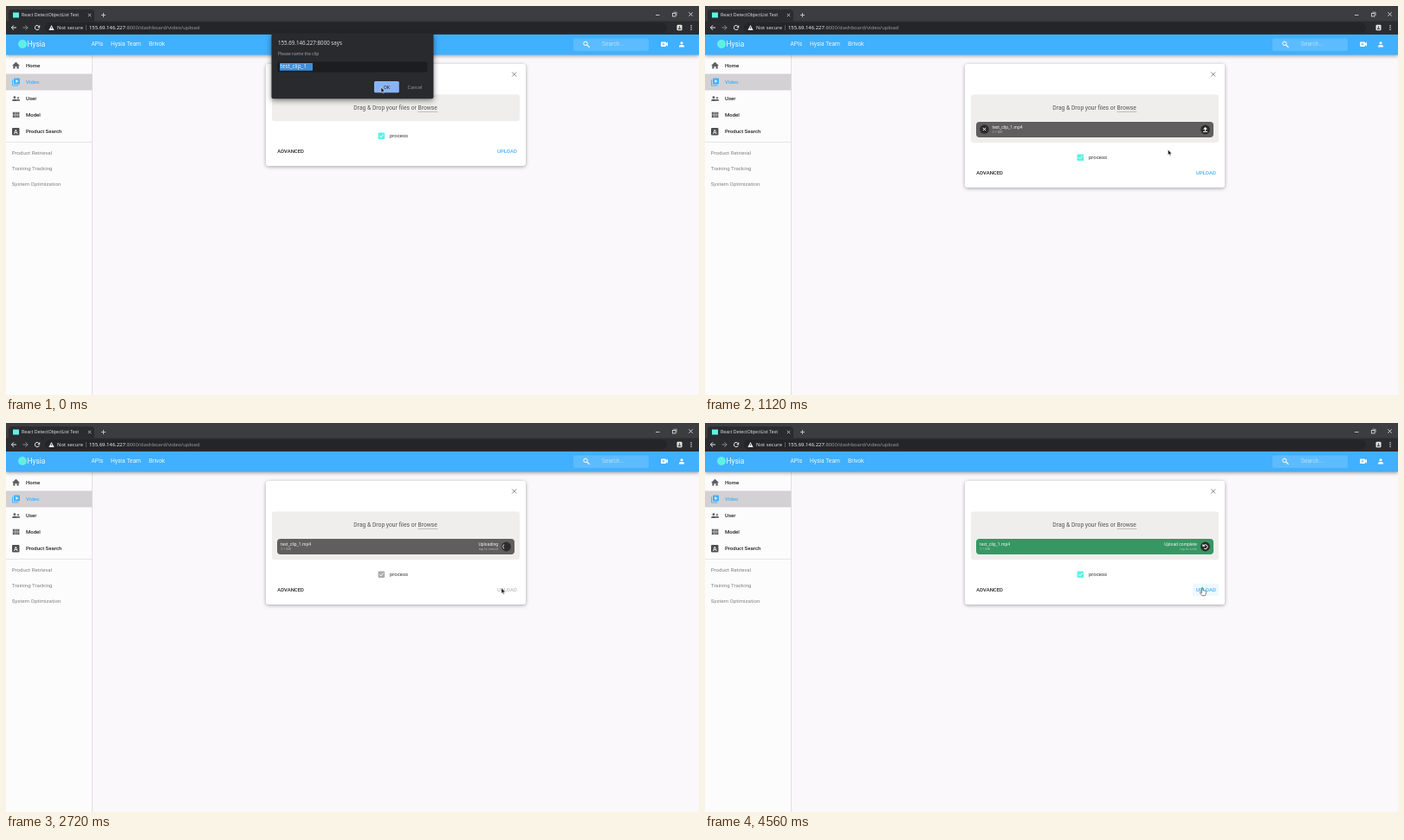
These frames come from a looping animation (800x450 px, 4.6 s). An HTML page with a canvas:

```html
<!DOCTYPE html>
<html lang="en">
<head>
<meta charset="utf-8">
<title>Video upload</title>
<style>
  html, body { margin: 0; width: 100%; height: 100%; overflow: hidden; background: #faf8fb; }
  canvas { display: block; width: 800px; height: 450px; }
</style>
</head>
<body>
<canvas id="stage" width="800" height="450"></canvas>
<script>
const c = document.getElementById('stage').getContext('2d');
const LOOP = 4600, TAU = Math.PI * 2;
const UI = 'Roboto, sans-serif', SYS = '"Noto Sans", sans-serif';
const BLUE = '#40b0ff', CYAN = '#5ff0e4';

const ramp = (t, a, b) => Math.min(1, Math.max(0, (t - a) / (b - a)));
const easeOut = p => 1 - (1 - p) ** 3;
const easeInOut = p => p * p * (3 - 2 * p);
const mix = (a, b, p) => a + (b - a) * p;
const mixColor = (a, b, p) => `rgb(${a.map((v, i) => Math.round(mix(v, b[i], p)))})`;

function text(s, x, y, size, color, { font = UI, weight = 400, align = 'left' } = {}) {
  c.font = `${weight} ${size}px ${font}`;
  c.textAlign = align;
  c.textBaseline = 'middle';
  c.fillStyle = color;
  c.fillText(s, x, y);
}
function box(x, y, w, h, color, r = 0) {
  c.fillStyle = color;
  c.beginPath();
  c.roundRect(x, y, w, h, r);
  c.fill();
}
function disc(x, y, r, color) {
  c.fillStyle = color;
  c.beginPath();
  c.arc(x, y, r, 0, TAU);
  c.fill();
}
function poly(points, color) {
  c.fillStyle = color;
  c.beginPath();
  points.forEach(([x, y]) => c.lineTo(x, y));
  c.closePath();
  c.fill();
}
function line(points, color, width = 1) {
  c.strokeStyle = color;
  c.lineWidth = width;
  c.beginPath();
  points.forEach(([x, y], i) => i ? c.lineTo(x, y) : c.moveTo(x, y));
  c.stroke();
}
function arc(x, y, r, from, to, color, width = 1) {
  c.strokeStyle = color;
  c.lineWidth = width;
  c.beginPath();
  c.arc(x, y, r, from, to);
  c.stroke();
}
function cross(x, y, r, color, width = 1) {
  line([[x - r, y - r], [x + r, y + r]], color, width);
  line([[x + r, y - r], [x - r, y + r]], color, width);
}
function shadowed(blur, dy, alpha, draw) {
  c.save();
  c.shadowColor = `rgba(0,0,0,${alpha})`;
  c.shadowBlur = blur;
  c.shadowOffsetY = dy;
  draw();
  c.restore();
}
function faded(alpha, draw) {
  if (alpha <= 0) return;
  c.save();
  c.globalAlpha *= alpha;
  draw();
  c.restore();
}
function person(x, y, s, color) {
  disc(x, y - s * 0.5, s * 0.46, color);
  box(x - s * 0.9, y + s * 0.2, s * 1.8, s * 0.7, color, [s * 0.6, s * 0.6, 0, 0]);
}

function browser() {
  box(0, 0, 800, 33, '#2b2c2f');
  box(0, 0, 800, 17.5, '#3c3d40');
  box(3, 4, 99, 14, '#2b2c2f', [4, 4, 0, 0]);
  box(8, 7.5, 7, 6, CYAN);
  text('React DetectObjectList Test', 18, 10.5, 5.2, '#e0e0e0', { font: SYS });
  cross(96.5, 10.5, 1.7, '#d0d0d0', 0.8);
  line([[110, 10.5], [115, 10.5]], '#d8d8d8', 0.8);
  line([[112.5, 8], [112.5, 13]], '#d8d8d8', 0.8);
  line([[750, 10.5], [754.5, 10.5]], '#e0e0e0', 0.8);
  c.strokeStyle = '#e0e0e0';
  c.strokeRect(769.5, 8.5, 3.5, 3.5);
  line([[770.5, 7.2], [774.2, 7.2], [774.2, 11]], '#e0e0e0', 0.6);
  cross(790.5, 9.5, 2.1, '#e8e8e8', 0.9);

  box(45, 19, 718, 12, '#242528', 6);
  line([[12, 25], [6.5, 25]], '#e8e8e8');
  line([[9, 22.3], [6.3, 25], [9, 27.7]], '#e8e8e8');
  line([[19.5, 25], [25, 25]], '#8c8c8c');
  line([[22.5, 22.3], [25.2, 25], [22.5, 27.7]], '#8c8c8c');
  arc(36, 25, 2.6, 0.3, 5.4, '#e8e8e8', 1);
  poly([[39.2, 22], [39.2, 25], [36.3, 25]], '#e8e8e8');
  poly([[52.5, 22], [55.7, 28], [49.3, 28]], '#e8e8e8');
  line([[52.5, 24.2], [52.5, 26.2]], '#242528', 0.7);
  text('Not secure', 59, 25, 5.9, '#e0e0e0', { font: SYS });
  line([[92.5, 22], [92.5, 28]], '#77787a', 0.6);
  const host = '155.69.146.227';
  text(host, 96, 25, 5.9, '#eeeeee', { font: SYS });
  text(':8000/dashboard/video/upload', 96 + c.measureText(host).width, 25, 5.9, '#9b9da0', { font: SYS });
  box(774.5, 21.8, 6, 6.4, '#e8e8e8', 1);
  person(777.5, 25.3, 1.9, '#2b2c2f');
  [-2.3, 0, 2.3].forEach(dy => disc(791, 25 + dy, 0.75, '#e0e0e0'));
}

function header() {
  shadowed(4, 1, 0.35, () => box(0, 33, 800, 23.5, BLUE));
  disc(19, 44, 5, CYAN);
  text('Hysia', 24.5, 44.3, 8.4, '#f2fbff');
  text('APIs', 98.5, 44.2, 6.67, '#eef8ff');
  text('Hysia Team', 121, 44.2, 6.67, '#eef8ff');
  text('Brivok', 165, 44.2, 6.67, '#eef8ff');
  box(655, 37.5, 87, 14.5, 'rgba(255,255,255,.15)', 2);
  arc(669, 43.3, 2.2, 0, TAU, '#fff', 1);
  line([[670.6, 44.9], [673.6, 47.9]], '#fff', 1.2);
  text('Search...', 688, 44.3, 6.67, 'rgba(255,255,255,.55)');
  box(756, 41.5, 6, 5.5, '#fff', 0.8);
  poly([[761, 44.2], [764, 41.6], [764, 46.8]], '#fff');
  line([[757.4, 44.2], [760.6, 44.2]], BLUE, 0.7);
  line([[759, 42.6], [759, 45.8]], BLUE, 0.7);
  person(780, 44.4, 3.4, '#fff');
}

function sidebar() {
  box(0, 57, 99, 393, '#fdfcfd');
  box(99, 57, 1, 393, '#e2e0e2');
  box(0, 78.5, 99.5, 19, '#d3d1d3');
  ['Home', 'Video', 'User', 'Model', 'Product Search'].forEach((label, i) =>
    text(label, 23, 69 + i * 19, 6, i === 1 ? BLUE : '#222', { weight: 500 }));
  const ink = '#606062';
  poly([[11.5, 64.8], [16, 69], [14.7, 69], [14.7, 72.6], [12.5, 72.6], [12.5, 70],
    [10.5, 70], [10.5, 72.6], [8.3, 72.6], [8.3, 69], [7, 69]], ink);
  box(9, 83.5, 7, 7, BLUE, 0.7);
  line([[7.5, 85.3], [7.5, 92], [14.3, 92]], BLUE, 0.9);
  poly([[11.4, 85], [14.5, 87], [11.4, 89]], '#e8f5ff');
  person(9.9, 107.2, 3, ink);
  person(14, 107.5, 2.4, ink);
  for (let i = 0; i < 6; i++) box(7.8 + i % 3 * 2.7, 122.7 + Math.floor(i / 3) * 3.5, 2.2, 3, ink);
  box(7, 141, 8.5, 8.5, '#505052', 1);
  text('A', 11.25, 145.5, 7, '#fff', { weight: 500, align: 'center' });
  box(0, 157.2, 99, 0.8, '#e0dee0');
  ['Product Retrieval', 'Training Tracking', 'System Optimization'].forEach((label, i) =>
    text(label, 6.7, 170.4 + i * 18, 6.13, '#808082'));
}

function fileItem(t) {
  const y = mix(133, 134, ramp(t, 680, 860)), mid = y + 9;
  const sent = easeOut(ramp(t, 2080, 2440));
  const done = ramp(t, 3760, 4040);
  const white = a => `rgba(255,255,255,${a})`;
  box(313, y, 274, 18, mixColor([96, 94, 94], [54, 151, 99], done), 4);

  const nameX = mix(331.5, 317, sent);
  text('test_clip_1.mp4', nameX, mid - 2.3, 5, '#f4f4f4');
  text('3.1 MB', nameX, mid + 3, 3.9, white(0.5));
  const status = (main, sub) => {
    text(main, 568, mid - 2.3, 5, '#f4f4f4', { align: 'right' });
    text(sub, 568, mid + 3, 3.9, white(0.5), { align: 'right' });
  };
  faded(sent * (t < 3760 ? 1 : 0), () => status('Uploading', 'tap to cancel'));
  faded(ramp(t, 3760, 3860), () => status('Upload complete', 'tap to undo'));

  faded(1 - sent, () => {
    disc(322.5, mid - 0.5, 5.3, '#2e2d2d');
    cross(322.5, mid - 0.5, 1.6, '#fff', 1);
  });
  disc(577.5, mid, 5.4, '#2b2d2c');
  faded(1 - sent, () => {
    poly([[577.5, mid - 3], [580, mid - 0.4], [575, mid - 0.4]], '#fff');
    line([[577.5, mid - 1], [577.5, mid + 1.5]], '#fff', 1.3);
    line([[575, mid + 2.4], [580, mid + 2.4]], '#fff', 0.9);
  });
  faded(sent * (1 - ramp(t, 3860, 4060)), () => {
    const start = (t - 3200) / 1000 * TAU - 0.9;
    const span = mix(0.5, 2.6, ramp(t, 2250, 3200));
    arc(577.5, mid, 3.7, start, start + span, '#e8e8e8', 0.9);
  });
  faded(ramp(t, 3960, 4200), () => {
    arc(577.7, mid + 0.2, 2.4, -2.5, 2.3, '#fff', 1);
    poly([[574.3, mid - 3], [574.5, mid + 0.2], [577.4, mid - 0.8]], '#fff');
  });
}

function panel(t) {
  const grow = 25 * easeOut(ramp(t, 160, 600));
  const disabled = t >= 2560 && t < 3760;
  shadowed(4, 1, 0.35, () => box(300, 67, 300, 118 + grow, '#fff', 3));
  cross(586.7, 79, 2.5, '#666', 0.8);
  box(307, 102.5, 286, 30.8 + grow, '#efeeec', 3);

  const prompt = 'Drag & Drop your files or ';
  text(prompt, 401.3, 118.5, 6.75, '#555');
  const linkX = 401.3 + c.measureText(prompt).width;
  text('Browse', linkX, 118.5, 6.75, '#555');
  line([[linkX, 122.4], [498.4, 122.4]], '#999', 0.6);
  faded(ramp(t, 240, 480), () => fileItem(t));

  const optionY = 150.2 + grow, actionY = 168 + grow;
  box(429.6, optionY - 3.8, 7.6, 7.6, disabled ? '#acacac' : CYAN, 1);
  line([[431.3, optionY], [432.9, optionY + 1.7], [435.8, optionY - 1.7]], '#fff', 0.9);
  text('process', 443, optionY, 5.95, '#333');
  text('ADVANCED', 313.3, actionY, 5.95, '#222', { weight: 500 });

  const hover = disabled ? 0 : t < 3000
    ? 0.09 * ramp(t, 1280, 1480) + 0.1 * ramp(t, 2060, 2240)
    : 0.09 * ramp(t, 3860, 4100);
  if (hover) box(563, actionY - 7.2, 30, 14.5, `rgba(64,176,255,${hover})`, 2);
  text('UPLOAD', 567, actionY, 6, disabled ? '#b9b9b9' : BLUE, { weight: 500 });
}

function dialog() {
  shadowed(6, 2, 0.5, () => box(306.5, 32, 187, 75.3, '#292a2d', [0, 0, 2, 2]));
  text('155.69.146.227:8000 says', 314, 43.5, 6.2, '#dcdcdc', { font: SYS });
  text('Please name the clip', 314, 55.3, 4.9, '#a2a4a7', { font: SYS });
  box(313.5, 64.5, 173, 12, '#1c1d20', 1.5);
  box(316, 66, 38, 8.8, '#3f8fd8');
  text('test_clip_1', 316.8, 70.5, 6.2, '#e8f4ff', { font: SYS });
  box(425, 87, 28.8, 13.3, '#8ab4f8', 1.5);
  text('OK', 439.4, 94, 5.4, '#202124', { font: SYS, align: 'center' });
  text('Cancel', 472, 94, 5.4, '#8f9aaa', { font: SYS, align: 'center' });
}

function outlined(points, fill, stroke) {
  poly(points, fill);
  line([...points, points[0]], stroke, 0.6);
}
function cursor(t) {
  const settle = easeOut(ramp(t, 80, 480)), move = easeInOut(ramp(t, 760, 1320));
  const x = mix(mix(433, 437, settle), 574.2, move);
  const y = mix(mix(94, 107, settle), 190.3, move);
  const disabled = t >= 2560 && t < 3760;
  c.save();
  if (t < 1280 || disabled) {
    c.translate(disabled ? 572 : x, disabled ? 191 : y);
    outlined([[0, 0], [0, 6.2], [1.4, 4.9], [2.3, 7], [3.3, 6.6], [2.4, 4.6], [4.3, 4.5]], '#111', '#ddd');
  } else {
    c.translate(x, y);
    outlined([[-0.7, 0.5], [0, 0], [0.7, 0.5], [0.7, 3.2], [3.8, 4], [4.4, 5], [3.8, 8],
      [3.2, 9.4], [-0.4, 9.4], [-2.9, 5.8], [-2.3, 5.1], [-0.7, 6.2]], '#fff', '#333');
  }
  c.restore();
}

function draw(now) {
  const t = now % LOOP;
  box(0, 0, 800, 450, '#faf8fb');
  sidebar();
  panel(t);
  header();
  browser();
  if (t < 120) dialog();
  cursor(t);
  requestAnimationFrame(draw);
}
requestAnimationFrame(draw);
</script>
</body>
</html>
```
